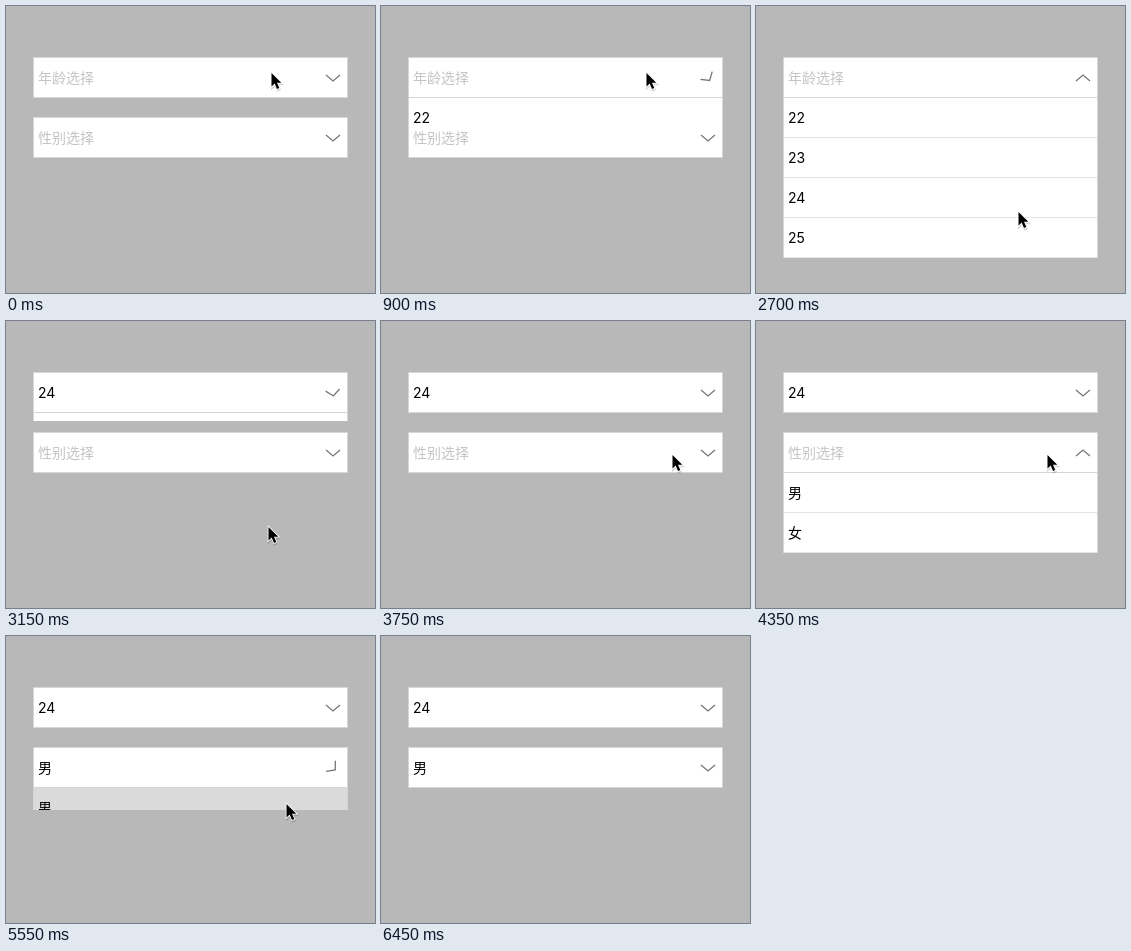
Animation, 369 px wide and 287 px high, one loop 6720 ms. Source, as an HTML page:

```html
<!DOCTYPE html>
<html lang="zh">
<head>
<meta charset="utf-8">
<style>
  html, body { margin: 0; height: 100%; overflow: hidden; background: #b8b8b8; }
  svg { display: block; }
  text { font: 14px Inter, "Noto Sans CJK SC", "Noto Sans CJK", sans-serif; }
</style>
</head>
<body>
<svg id="stage" width="369" height="287"></svg>
<script>
const LOOP = 6720, TICK = 150, SLIDE = 200, ROW = 40;
const stage = document.getElementById('stage');

const selects = [
  { y: 111, hint: '性别选择', items: ['男', '女'], pick: 0, open: 4130, press: 5390, close: 5463 },
  { y: 51, hint: '年龄选择', items: ['22', '23', '24', '25'], pick: 2, open: 870, press: 2990, close: 3005 }
];

// Pointer stops: time, x, y
const stops = [
  [0, 265, 67], [1500, 265, 67], [1650, 267, 83], [2250, 267.5, 161], [2400, 267.5, 161],
  [2700, 262, 206], [3150, 262, 206], [3750, 291, 134], [4650, 291, 134],
  [5100, 280, 168], [5550, 280, 168], [6300, 335, 276]
];

// cubic-bezier(.25, .1, .25, 1)
function ease(x) {
  if (x <= 0) return 0;
  if (x >= 1) return 1;
  let lo = 0, hi = 1;
  for (let i = 0; i < 20; i++) {
    const s = (lo + hi) / 2;
    if (.75 * s * (1 - s) + s ** 3 < x) lo = s; else hi = s;
  }
  return .3 * lo * (1 - lo) ** 2 + 3 * lo * lo * (1 - lo) + lo ** 3;
}

const label = (x, y, s, color = '#000') => `<text x="${x}" y="${y}" fill="${color}">${s}</text>`;

function drawList(s, t, shown) {
  const height = Math.round(shown * s.items.length * ROW);
  if (!height) return '';
  const rows = s.items.map((item, i) => {
    const y = i * ROW, pressed = i === s.pick && t >= s.press;
    return `<rect y="${y}" width="315" height="${ROW}" fill="${pressed ? '#dadada' : '#fff'}"/>
      <rect y="${y + ROW - 1}" width="315" height="1" fill="#e4e4e4"/>` + label(5, y + 24.5, item);
  }).join('');
  return `<svg x="27" y="${s.y + 41}" width="315" height="${height}">${rows}
    <path d="M.5 0V${height}M314.5 0V${height}" stroke="#d6d6d6"/></svg>`;
}

function drawSelect(s, t) {
  const shown = ease((t - s.open) / SLIDE) - ease((t - s.close) / SLIDE);
  const chosen = t >= s.close;
  return `<rect x="27.5" y="${s.y + .5}" width="314" height="40" fill="#fff" stroke="#d6d6d6"/>`
    + label(32, s.y + 25.5, chosen ? s.items[s.pick] : s.hint, chosen ? '#000' : '#c4c4c4')
    + `<path transform="translate(327 ${s.y + 21}) rotate(${-180 * shown})"
        d="M-7 -3L0 3L7 -3" fill="none" stroke="#777" stroke-width="1.3"/>`
    + drawList(s, t, shown);
}

function drawPointer(t) {
  if (t > 6300) return '';
  const i = stops.findIndex(p => p[0] > t);
  const b = stops.at(i), a = i < 0 ? b : stops[i - 1];
  const k = i < 0 ? 0 : (t - a[0]) / (b[0] - a[0]);
  const x = a[1] + (b[1] - a[1]) * k, y = a[2] + (b[2] - a[2]) * k;
  const d = 'M0 0V13.5L3.2 10.6L5.5 16L7.8 15L5.5 9.8H9.8Z';
  return `<g transform="translate(${x + .5} ${y})">
    <path d="${d}" transform="translate(.5 1.5)" stroke="#000" stroke-width="2" opacity=".15"/>
    <path d="${d}" stroke="#fff" stroke-width="1.6" paint-order="stroke"/></g>`;
}

let last = -1;
function frame() {
  const t = Math.floor(performance.now() % LOOP / TICK) * TICK;
  if (t !== last) {
    last = t;
    stage.innerHTML = selects.map(s => drawSelect(s, t)).join('') + drawPointer(t);
  }
  requestAnimationFrame(frame);
}
frame();
</script>
</body>
</html>
```
